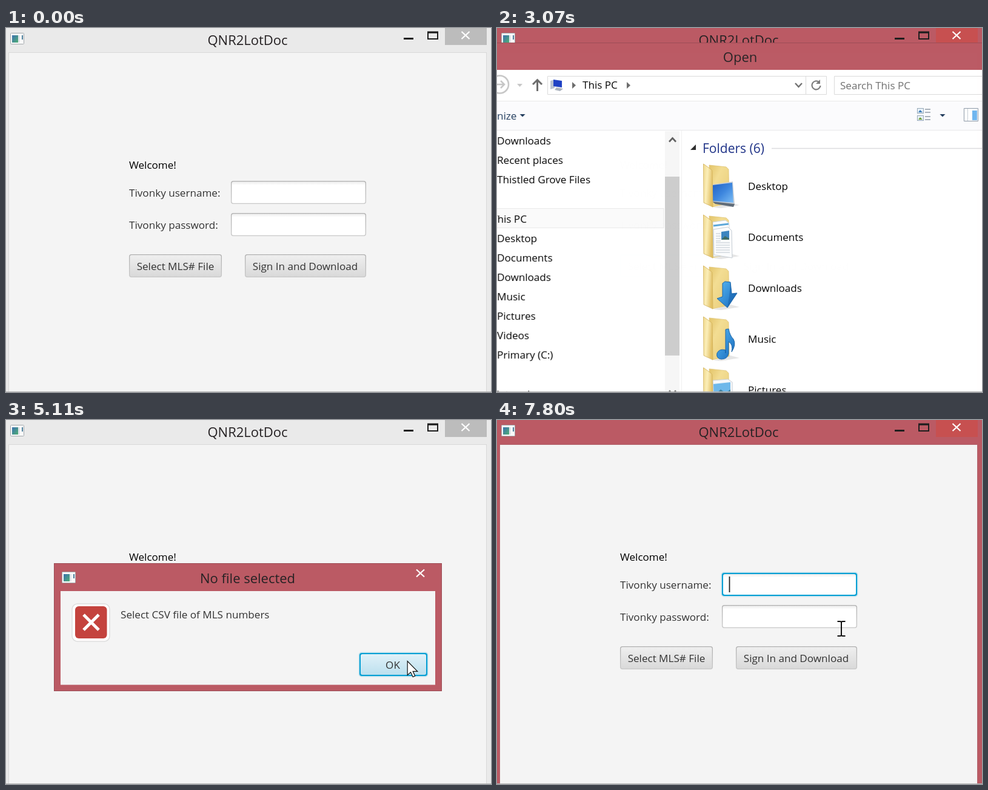
These frames come from a looping animation (800 px wide and 600 px high, 8000 ms). An HTML page:

```html
<!DOCTYPE html>
<html lang="en">
<head>
<meta charset="utf-8">
<title>Form demo</title>
<style>
  html, body { margin: 0; width: 100%; height: 100%; overflow: hidden; background: #f4f4f4; }
  svg { position: absolute; left: 0; top: 0; width: 800px; height: 600px; overflow: visible; }
  text { font: 17.1px "Open Sans", "Noto Sans", sans-serif; fill: #333; white-space: pre; }
  .title { font-size: 22px; fill: #262224; text-anchor: middle; }
  .mid { text-anchor: middle; }
  .dark { fill: #000; }
  #open { transform-origin: 400px 200px; }
  #alert { transform-origin: 399px 341.5px; }
</style>
</head>
<body>
<svg id="main" viewBox="0 0 800 600">
  <defs>
    <linearGradient id="btn" x2="0" y2="1"><stop stop-color="#efefef"/><stop offset="1" stop-color="#d9d9d9"/></linearGradient>
    <linearGradient id="btnHover" x2="0" y2="1"><stop stop-color="#f9f9f9"/><stop offset="1" stop-color="#e9e9e9"/></linearGradient>
    <linearGradient id="btnDown" x2="0" y2="1"><stop stop-color="#d2d2d2"/><stop offset="1" stop-color="#c6c6c6"/></linearGradient>
    <linearGradient id="okFill" x2="0" y2="1"><stop stop-color="#cfe6f0"/><stop offset="1" stop-color="#a6cfe0"/></linearGradient>
    <linearGradient id="okHover" x2="0" y2="1"><stop stop-color="#e0f1f8"/><stop offset="1" stop-color="#bce0ee"/></linearGradient>
    <linearGradient id="edge" x2="0" y2="1"><stop stop-color="#b0b0b0"/><stop offset="1" stop-color="#c8c8c8"/></linearGradient>
    <linearGradient id="inset" x2="0" y2="1"><stop stop-color="#ececec"/><stop offset=".16" stop-color="#fff"/></linearGradient>
    <linearGradient id="back" x2="1" y2="1"><stop stop-color="#e3c468"/><stop offset=".35" stop-color="#f3dd92"/><stop offset="1" stop-color="#e8cb76"/></linearGradient>
    <linearGradient id="flap" x2="1" y2=".3"><stop stop-color="#f0d98c"/><stop offset=".45" stop-color="#fbeeb8"/><stop offset="1" stop-color="#e2c064"/></linearGradient>
    <linearGradient id="blue" x2="1" y2="1"><stop stop-color="#1f5fc4"/><stop offset=".5" stop-color="#3c86de"/><stop offset="1" stop-color="#7dbdf5"/></linearGradient>
    <linearGradient id="sky" x2="1" y2="1"><stop stop-color="#55b8f5"/><stop offset="1" stop-color="#1568bb"/></linearGradient>
    <linearGradient id="tile" x2="1" y2="1"><stop stop-color="#3c72b0"/><stop offset="1" stop-color="#4fae74"/></linearGradient>
    <g id="appIcon">
      <rect x=".5" y=".5" width="22" height="18" rx="1" fill="#fafafa" stroke="#a3a8ac"/>
      <rect x="3" y="4" width="10" height="12" fill="url(#tile)"/>
      <path d="M14.500 4V16" stroke="#d5dde2" stroke-width="2"/>
      <path d="M20 4V11" stroke="#4d7f9c" stroke-width="2"/>
    </g>
    <path id="cross" d="M-6.500 -6L6.500 6M6.500 -6L-6.500 6" fill="none" stroke="#fff" stroke-width="2.200"/>
  </defs>
  <rect id="frame" width="800" height="600"/>
  <rect id="client" x="4.500" y="40.500" width="788" height="570" fill="#f4f4f4"/>
  <use href="#appIcon" x="7" y="8"/>
  <text class="title" x="398.500" y="28">QNR2LotDoc</text>
  <rect x="656" y="16" width="16" height="3" fill="#1e1e1e"/>
  <path d="M696 7.500H712V18H696Z" fill="none" stroke="#1e1e1e" stroke-width="2"/>
  <path d="M695 7H713" stroke="#1e1e1e" stroke-width="3"/>
  <rect id="shut" x="724" width="69" height="28"/>
  <use href="#cross" x="758" y="12"/>
  <text x="203" y="232" class="dark">Welcome!</text>
  <text x="203" y="278">Tivonky username:</text>
  <text x="203" y="331">Tivonky password:</text>
  <g id="user"></g>
  <g id="pass"></g>
  <g id="pick"></g>
  <g id="sign"></g>
  <text class="mid" x="279.500" y="399">Select MLS# File</text>
  <text class="mid" x="493.500" y="399">Sign In and Download</text>
  <path id="caret" d="M383.500 258V284" stroke="#222" stroke-width="1.800"/>
</svg>

<svg id="open" viewBox="0 0 800 600">
  <rect x="-70" y="24" width="960" height="700" fill="#bb5a64"/>
  <path d="M-70 24.500H890" stroke="#9b4c55"/>
  <text class="title" x="401" y="56">Open</text>
  <rect x="-62" y="69" width="944" height="650" fill="#fff"/>
  <rect x="-62" y="120" width="944" height="49" fill="#fbfbfd"/>
  <path d="M-62 120.500H882M-62 168.500H882" stroke="#e8e8ea"/>
  <g fill="none" stroke="#c6c6c6" stroke-width="2.500">
    <circle cx="4.500" cy="93" r="14.500"/>
    <path d="M-4 93H12M6 87L12 93L6 99"/>
  </g>
  <path d="M33 92H42L37.500 97Z" fill="#c6c6c6"/>
  <path d="M66.500 104V86M59 93L66.500 85.500L74 93" fill="none" stroke="#6a6a6a" stroke-width="3"/>
  <g fill="none" stroke="#dadada">
    <path d="M83.500 79.500H543.500V109.500H83.500ZM509.500 79.500V109.500"/>
    <path d="M556.500 79.500H890V109.500H556.500Z"/>
  </g>
  <path d="M88 87L95 85V99L88 101Z" fill="#b9c2d0"/>
  <path d="M93 85L107 87V98L93 96Z" fill="#1d3fc4"/>
  <path d="M98 98L109 100L104 104L95 102Z" fill="#a9b1bd"/>
  <text class="dark" x="141" y="100.500">This PC</text>
  <path d="M124 89L130 94.500L124 100Z" fill="#6a6a6a"/>
  <path id="crumb" d="M214 89L220 94.500L214 100Z" fill="#6a6a6a"/>
  <path d="M492 91L497.500 97L503 91" fill="none" stroke="#707070" stroke-width="2.400"/>
  <path d="M531 89A7 7 0 1 0 533.500 95" fill="none" stroke="#7a7a7a" stroke-width="2.200"/>
  <path d="M533 85V92H526Z" fill="#7a7a7a"/>
  <text x="566" y="101" style="fill:#6d6d6d">Search This PC</text>
  <text x="-39" y="151" style="fill:#1e395b">Organize</text>
  <g fill="#1e395b"><path d="M37.500 142H46.500L42 146.500Z"/><path d="M730.500 142H739.500L735 146.500Z"/></g>
  <g id="views"></g>
  <path d="M770.500 132.500H793.500V153.500H770.500Z" fill="#fff" stroke="#8b97a5"/>
  <path d="M776.500 133V153" stroke="#c3cad2"/>
  <path d="M784 136H792V152H784Z" fill="#6fb6ef"/>
  <rect x="-62" y="297.500" width="337" height="32" fill="#fafafa" stroke="#e9e9e9"/>
  <g id="tree"></g>
  <rect x="277" y="170" width="24" height="540" fill="#f6f6f6"/>
  <rect x="277" y="245" width="24" height="295" fill="#cdcdcd"/>
  <g fill="none" stroke="#606060" stroke-width="2.600"><path d="M284 187.500L289.500 181.500L295 187.500M284 598L289.500 604L295 598"/></g>
  <path d="M304.500 169V710" stroke="#f0f0f0"/>
  <path d="M328 192V201H319Z" fill="#2b2b2b"/>
  <text x="339" y="206" style="font-size:21px;fill:#1e3287">Folders (6)</text>
  <path d="M453 198.500H882" stroke="#dcdcdf" stroke-width="1.500"/>
  <g id="folders"></g>
</svg>

<svg id="alert" viewBox="0 0 800 600">
  <g transform="translate(79 236)">
    <rect x=".5" y=".5" width="639" height="210" fill="#bb5a64" stroke="#9b4c55"/>
    <rect x="11" y="46" width="618" height="154.500" fill="#f4f4f4"/>
    <use href="#appIcon" x="13" y="14"/>
    <text class="title" x="319.500" y="33">No file selected</text>
    <use href="#cross" x="604.500" y="16.500"/>
    <rect x="30" y="67" width="62" height="62" rx="9" fill="#fff" stroke="#dedede" stroke-width="1.500"/>
    <rect x="35" y="71" width="52.500" height="53" rx="6" fill="#c4433e"/>
    <path d="M49 85L74 110M74 85L49 110" stroke="#fff" stroke-width="5"/>
    <text x="110" y="90.500">Select CSV file of MLS numbers</text>
    <g id="ok"></g>
    <text class="mid" x="559" y="174">OK</text>
  </g>
</svg>

<svg id="top" viewBox="0 0 800 600">
  <path d="M0 599.500H800" stroke="#b4b4b4"/>
  <g id="cursor" stroke="#111">
    <path id="arrow" d="M.5 .5V23.500L5.800 18.700L9.500 26.500L13 25L9.500 17.300H17Z" fill="#fff" stroke-width="1.200"/>
    <path id="beam" d="M-6.500 -12H-2Q0 -12 0 -10Q0 -12 2 -12H6.500M0 -10V10M-6.500 12H-2Q0 12 0 10Q0 12 2 12H6.500" fill="none" stroke-width="2"/>
    <path id="split" d="M-17 0L-9 -8V-3H9V-8L17 0L9 8V3H-9V8Z" fill="#fff" stroke-width="1.200"/>
  </g>
</svg>

<script>
const $ = id => document.getElementById(id);
const LOOP = 8000;
const clamp = v => Math.max(0, Math.min(1, v));
const show = (id, on) => $(id).setAttribute('visibility', on ? 'visible' : 'hidden');

const boxes = {
  user: [371, 252, 223, 38], pass: [371, 305, 223, 38],
  pick: [203, 373, 153, 38], sign: [394, 373, 200, 38],
  ok: [504, 148, 112, 38]
};

// Rounded control with an optional blue focus ring.
function control(id, fill, focus) {
  const [x, y, w, h] = boxes[id];
  const rect = (d, r, paint) =>
    `<rect x="${x + d}" y="${y + d}" width="${w - 2 * d}" height="${h - 2 * d}" rx="${r}" ${paint}/>`;
  const html = (focus ? rect(-1.5, 5, 'fill="#039ed3" opacity=".22"') : '') +
    rect(0, 4, `fill="${focus ? '#039ed3' : 'url(#edge)'}"`) +
    rect(focus ? 2 : 1.3, 3, `fill="url(#${fill})"`);
  if ($(id).dataset.look !== html) {
    $(id).innerHTML = html;
    $(id).dataset.look = html;
  }
}

const tree = ['Downloads', 'Recent places', 'Thistled Grove Files', '', 'This PC', 'Desktop', 'Documents',
  'Downloads', 'Music', 'Pictures', 'Videos', 'Primary (C:)', '', 'Network'];
$('tree').innerHTML = tree.map((name, i) =>
  `<text class="dark" x="${i === 4 || i === 13 ? -9 : 0}" y="${192.3 + 32.1 * i}">${name}</text>`).join('');

const lines = (x, y, w, n, gap) =>
  Array.from({ length: n }, (_, i) => `M${x} ${y + i * gap}h${w}`).join('');

$('views').innerHTML = [132, 144].map((y, i) =>
  `<rect x="693.500" y="${y + .5}" width="10" height="8" fill="#eaf3fa" stroke="#93a5b5"/>
   <path d="M695 ${y + 7}l3 -4l4 4z" fill="${i ? '#6f9c35' : '#3578b8'}"/>
   <path d="${lines(706, y + 2, 9, 2, 5)}" stroke="#8f9aa5" stroke-width="1.500"/>`).join('');

const emblems = {
  Desktop: `<path d="M15 34L49 29L52 66L15 63Z" fill="#c9d0d8"/><path d="M16 35L48 31L50 64L16 61Z" fill="url(#blue)"/>
    <path d="M15 62L52 66L50 71L20 66Z" fill="#5f6b78"/>`,
  Documents: `<path d="M16 12L37 9L43 14V66L17 69Z" fill="#fff" stroke="#ccd5dd"/><path d="M17 18L42 15" stroke="#5ba6d8" stroke-width="3"/>
    <path d="M17 24L41 20L47 26L48 71L18 66Z" fill="#fbfcfd" stroke="#c5ccd3"/>
    <path d="${lines(21, 31, 8, 4, 4)}${lines(21, 46, 23, 5, 4)}" stroke="#bcc5ce"/><path d="M30 28L43 26V41L30 41Z" fill="#3b84c0"/>
    <path d="M30 41L36 35L43 39V41Z" fill="#3d6b64"/>`,
  Downloads: `<path d="M32 29L36 26L45 27L47 46L56 45L40 69L23 54L32 51Z" fill="url(#sky)" stroke="#1763a8"/>
    <path d="M45 27L47 46L56 45L40 69L43 50Z" fill="#1259a3" opacity=".45"/>`,
  Music: `<path d="M37 60V21L42 20Q44 31 50 37Q55 46 47 58Q50 46 42 41V61Q40 70 30 70Q21 69 23 60Q27 52 37 55Z" fill="url(#sky)" stroke="#1763a8"/>`,
  Pictures: `<path d="M16 21L41 19L48 24V70L18 68Z" fill="#f7f9fb" stroke="#c5ccd3"/><path d="M17 27L45 24V64L18 64Z" fill="#6db8ea"/>
    <path d="M18 46L29 36L37 42L45 36V64H18Z" fill="#3c7e9a"/>`
};
$('folders').innerHTML = Object.entries(emblems).map(([name, art], i) =>
  `<g transform="translate(340 ${224 + 84 * i})">
    <path d="M17 72L45 64L60 68L30 73Z" fill="#000" opacity=".1"/>
    <path d="M10 2L38 5L42 9L43 65L15 71Z" fill="url(#back)" stroke="#dcbf6b" stroke-width=".7"/>
    ${art}<path d="M.5 0L13 9Q15 10 15 13L16 71L1 64Z" fill="url(#flap)" stroke="#d0ae54" stroke-width=".8"/>
    <text class="dark" x="74" y="42.800">${name}</text></g>`).join('');

// Pointer path: time, x, y.
const path = [
  [300, 655, 640], [350, 645, 588], [700, 440, 478], [1050, 302, 401], [1130, 305, 403],
  [1640, 304, 402], [1700, 304, 402], [2045, 751, 275], [2099, 751, 275], [2100, 770, 309],
  [2149, 770, 309], [2150, 850, 560], [3300, 850, 560], [3450, 770, 540], [4000, 576, 396],
  [4750, 576, 396], [5150, 664, 397], [5390, 652, 397], [5950, 652, 397], [6280, 556, 293],
  [6550, 556, 293], [6750, 535, 273], [6900, 535, 273], [7300, 568, 344], [8000, 568, 344]
];

function pointer(t) {
  if (t <= path[0][0]) return [655, 640];
  const i = path.findIndex(k => k[0] >= t);
  const [a, b] = [path[i - 1], path[i]];
  const u = (t - a[0]) / (b[0] - a[0]);
  const e = u * u * (3 - 2 * u);
  return [a[1] + (b[1] - a[1]) * e, a[2] + (b[2] - a[2]) * e];
}

const inside = (id, x, y, dx = 0, dy = 0) => {
  const [bx, by, w, h] = boxes[id];
  return x >= bx + dx && x <= bx + dx + w && y >= by + dy && y <= by + dy + h + 2;
};

// Window presence: eased in, linear out.
const presence = (t, start, close, fade) => t < close
  ? 1 - (1 - clamp((t - start) / 280)) ** 2
  : 1 - clamp((t - close) / fade);

function pose(id, p, tilt) {
  const s = $(id).style;
  s.display = p > 0 ? '' : 'none';
  s.opacity = p;
  s.transform = p < 1
    ? `perspective(1240px) rotateX(${-tilt * (1 - p)}deg) scale(${.94 + .06 * p})` : 'none';
}

function draw(t) {
  const between = (a, b) => t >= a && t < b;
  const active = between(1270, 1480) || between(3070, 4220) || t >= 5540;
  $('frame').setAttribute('fill', active ? '#bb5a64' : '#eaeaea');
  $('client').setAttribute('stroke', active ? '#b0636b' : '#d8d8d8');
  $('shut').setAttribute('fill', active ? '#c75050' : '#bcbcbc');

  const [x, y] = pointer(t);
  const free = !between(1560, 3200) && !between(4220, 5540);
  const look = (id, down) => down ? 'btnDown' : free && inside(id, x, y) ? 'btnHover' : 'btn';
  const focus = !active ? '' : t < 4060 ? 'pick' : t < 6900 ? 'sign' : 'user';
  control('user', 'inset', focus === 'user');
  control('pass', 'inset', false);
  control('pick', look('pick', between(1270, 1370)), focus === 'pick');
  control('sign', look('sign', between(4060, 4160)), focus === 'sign');
  control('ok', inside('ok', x, y, 79, 236) ? 'okHover' : 'okFill', true);
  show('caret', between(6900, 7390) || t >= 7800);

  pose('open', presence(t, 1470, 3070, 200), 4);
  pose('alert', presence(t, 4220, 5540, 180), 25);
  show('crumb', t >= 1800);

  const split = between(1560, 1760);
  const beam = free && (inside('user', x, y) || inside('pass', x, y));
  show('split', split);
  show('beam', beam);
  show('arrow', !split && !beam);
  $('cursor').setAttribute('transform', `translate(${x.toFixed(1)} ${y.toFixed(1)})`);
}

const began = performance.now();
function tick() {
  draw((performance.now() - began) % LOOP);
  requestAnimationFrame(tick);
}
tick();
</script>
</body>
</html>
```
